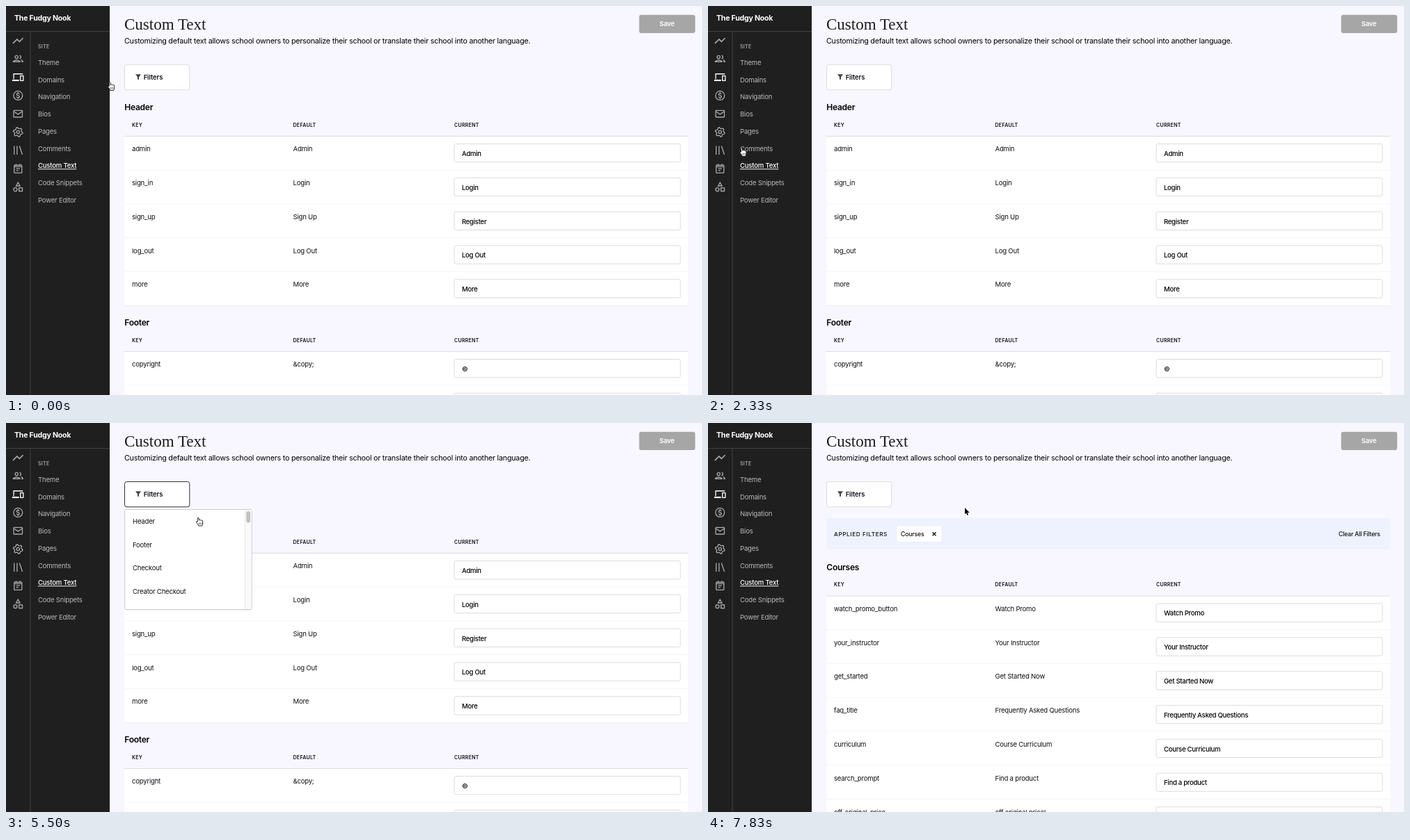
These frames come from a looping animation (1000 by 560 pixels, 8 s). An HTML page:

```html
<!DOCTYPE html>
<html lang="en">
<head>
<meta charset="utf-8">
<title>Custom Text</title>
<style>
  html, body { margin: 0; width: 100%; height: 100%; overflow: hidden; background: #f8f7ff; }
  svg { display: block; width: 100%; height: 100%; }
  text { font: 400 9.55px Inter, "Open Sans", sans-serif; letter-spacing: -.021em; fill: #0e0e16; white-space: pre; }
  .title { font: 400 23px "Liberation Serif", serif; letter-spacing: 0; fill: #1c1c1c; }
  .lead { font-size: 10.73px; fill: #000; }
  .brand { font-size: 10.6px; font-weight: 700; fill: #fff; }
  .heading { font-size: 12px; font-weight: 600; fill: #000; }
  .label { font-size: 7px; font-weight: 600; letter-spacing: .3px; }
  .strong { font-size: 9.4px; font-weight: 600; letter-spacing: -.01em; }
  .value { font-weight: 500; letter-spacing: -.03em; fill: #000; }
  .save { font-weight: 600; fill: #fff; }
  .tip { font-size: 8.6px; font-weight: 700; }
  .applied { font-size: 8.2px; font-weight: 500; letter-spacing: .6px; }
  .chip { font-size: 8.7px; font-weight: 500; }
  .nav { fill: #b9b9b9; }
  .nav.hover { fill: #fff; }
  .nav.active { fill: #fff; font-weight: 500; text-decoration: underline; }
  .site { fill: #a8a8a8; }
  .icon { fill: none; stroke: #a9a9a9; stroke-width: 1.9; }
  .icon.active { stroke: #fff; }
  .box { fill: #fff; stroke: #dcdce0; }
  .box.focus { stroke: #303036; }
</style>
</head>
<body>
<svg id="stage" viewBox="0 0 1000 560"></svg>
<script>
const LOOP = 8000, STEP = 1000 / 6;
const ROW = 48.8, ITEM = 33.4, SCROLL = 74.4;

const text = (x, y, str, cls = '') =>
  `<text x="${x}" y="${y}" class="${cls}">${str.replace(/&/g, '&amp;')}</text>`;
const rect = (x, y, w, h, attrs = '') =>
  `<rect x="${x}" y="${y}" width="${w}" height="${h}" ${attrs}/>`;
const circle = (x, y, r) => `<circle cx="${x}" cy="${y}" r="${r}"/>`;
const path = (d, attrs = '') => `<path d="${d}" ${attrs}/>`;
const group = (id, body) => `<g id="${id}">${body}</g>`;

const gear = () => {
  const points = Array.from({ length: 24 }, (_, i) => {
    const angle = (i + .5) * Math.PI / 12, r = i % 4 < 2 ? 9.8 : 7.4;
    return [12 + r * Math.cos(angle), 12 + r * Math.sin(angle)];
  });
  return path(`M${points.join('L')}z`) + circle(12, 12, 3);
};

// Sidebar icons, each in a 24 unit box
const icons = [
  path('M2 17l8-8 5 5 7-7', 'stroke-width="2.4" stroke-linecap="round"'),
  circle(9, 8, 3) + path('M2 18v-1q7-5 14 0v1zM15 5c4 0 4 6 0 6M18 14q4 1 4 4h-3'),
  path('M22 5H3v11') + path('M0 18.5h14', 'stroke-width="3"') + rect(17, 9, 6, 10),
  circle(12, 12, 9.3) + path('M15 9c-1-2-6-2-6 .5s6 2 6 5-5 2.500-6 0M12 5v2.500M12 16.500v2.500'),
  rect(3, 5, 18, 14, 'rx="1"') + path('M3 7l9 6 9-6'),
  gear(),
  path('M4 3v18M10 3v18M15 3l6 18'),
  rect(4, 5, 16, 16, 'rx="1"') + path('M4 8h16M8 2v3M16 2v3M8 12h8M8 16h5'),
  path('M12 3l4 7H8z') + circle(6.5, 17.5, 3.6) + rect(14, 14, 7, 7)
];
const pages = ['Theme', 'Domains', 'Navigation', 'Bios', 'Pages', 'Comments',
  'Custom Text', 'Code Snippets', 'Power Editor'];

const sidebar =
  rect(0, 0, 149, 560, 'fill="#1f1f1f"') +
  path('M0 36.5H149M35 37V560', 'stroke="#424242"') +
  text(12, 21, 'The Fudgy Nook', 'brand') +
  text(46, 60.5, 'SITE', 'label site') +
  icons.map((body, i) =>
    `<g class="icon${i === 2 ? ' active' : ''}" transform="translate(9 ${41.7 + 26.3 * i}) scale(.69)">${body}</g>`).join('') +
  pages.map((name, i) =>
    text(46, 85 + 24.72 * i, name, name === 'Custom Text' ? 'nav active' : 'nav')).join('');

const row = (y, [key, value, current = value]) =>
  rect(170, y, 810, ROW, 'fill="#fff"') +
  path(`M170 ${y + ROW}H980`, 'stroke="#eeeef1"') +
  text(181, y + 21.7, key) + text(412.5, y + 21.7, value) +
  rect(644, y + 11, 325, 26.3, 'rx="2.5" class="box"') +
  text(655, y + 28.4, current, 'value');

const section = (y, name, rows) =>
  text(170.3, y + 4.3, name, 'heading') +
  text(181, y + 27.5, 'KEY', 'label') +
  text(412.5, y + 27.5, 'DEFAULT', 'label') +
  text(644, y + 27.5, 'CURRENT', 'label') +
  rows.map((r, i) => row(y + 41.5 + ROW * i, r)).join('') +
  path(`M170 ${y + 41.5}H980`, 'stroke="#dcdce2"');

const allSections =
  section(146, 'Header', [['admin', 'Admin'], ['sign_in', 'Login'],
    ['sign_up', 'Sign Up', 'Register'], ['log_out', 'Log Out'], ['more', 'More']]) +
  section(456, 'Footer', [['copyright', '&copy;', '©'], ['', '']]);

const courses =
  rect(170, 137, 810, 45, 'fill="#edf2fe"') +
  text(181, 162.5, 'APPLIED FILTERS', 'applied') +
  rect(271, 148, 65, 23.5, 'rx="1" fill="#fff" stroke="#e6e9f3" stroke-width=".6"') +
  text(277, 162.7, 'Courses', 'chip') +
  path('M322.5 157.3l5 5m0-5l-5 5', 'stroke="#111" stroke-width="1.4"') +
  text(906, 162.7, 'Clear All Filters', 'chip') +
  section(207.5, 'Courses', [['watch_promo_button', 'Watch Promo'],
    ['your_instructor', 'Your Instructor'], ['get_started', 'Get Started Now'],
    ['faq_title', 'Frequently Asked Questions'], ['curriculum', 'Course Curriculum'],
    ['search_prompt', 'Find a product'], ['off_original_price', 'off original price!']]);

const header =
  text(170, 34, 'Custom Text', 'title') +
  text(170, 53.5, 'Customizing default text allows school owners to personalize their school or translate their school into another language.', 'lead') +
  rect(909.7, 12.7, 80.5, 26.3, 'rx="3" fill="#a6a6a6"') +
  text(938.7, 29.4, 'Save', 'save') +
  rect(170.5, 84.5, 93.3, 36.3, 'rx="3" class="box" id="button"') +
  path('M186 98.3h8l-3 4v3.500h-2v-3.500z', 'fill="#444"') +
  text(197.7, 106.3, 'Filters', 'strong');

const options = ['Header', 'Footer', 'Checkout', 'Creator Checkout', 'Courses', 'Lectures', 'Creator Product'];
const menu =
  rect(171, 126, 183, 144, 'rx="3" opacity=".06"') +
  rect(170.5, 124.5, 182.5, 144, 'rx="2" fill="#fff" stroke="#cbcbd0"') +
  rect(171, 184, 172, 34, 'fill="#f3f3f3" id="hover"') +
  `<g clip-path="url(#menuClip)">${group('list',
    options.map((name, i) => text(182, 145.3 + ITEM * i, name)).join(''))}</g>` +
  rect(343.5, 125, 9, 143, 'fill="#fafafa"') +
  path('M343.5 125V268', 'stroke="#e8e8e8"') +
  rect(345.3, 127, 5.7, 16.5, 'rx="2.8" fill="#c1c1c1" id="thumb"');

const tooltip =
  rect(32, 87.5, 37.5, 35.5, 'rx="3" fill="#fff"') +
  path('M33 96l-4.5 4 4.5 4z', 'fill="#fff"') +
  text(42.7, 109, 'Site', 'tip');

const hand =
  path('M-2.8-5q1-2 2 0v3q1-1.500 2 0 1-1 2 .5 1.500-.5 1.500 1v2.500q0 2-1 4h-5q-.5-2-3-5-.5-2 1.500-1z',
    'fill="#fff" stroke="#111" stroke-width=".9" stroke-linejoin="round"') +
  path('M-.5 1.500v2.500m1.700-2.500v2.500m1.700-2.500v2.500', 'stroke="#111" stroke-width=".6"');
const arrow = path('M0 0v9.500l2-2 1.500 3.500 1.500-1-1.300-3h3z',
  'stroke="#fff" stroke-width="1.4" paint-order="stroke"');

document.getElementById('stage').innerHTML =
  '<defs><clipPath id="menuClip"><rect x="171" y="125" width="172" height="143"/></clipPath></defs>' +
  rect(0, 0, 1000, 560, 'fill="#f8f7ff"') + header +
  group('all', allSections) + group('courses', courses) + group('menu', menu) +
  sidebar + group('tooltip', tooltip) + group('hand', hand) + group('arrow', arrow);

const $ = id => document.getElementById(id);
const show = (id, on) => { $(id).style.display = on ? '' : 'none'; };
const theme = document.querySelector('.nav');

const progress = (t, from, to) => Math.min(1, Math.max(0, (t - from) / (to - from)));
const ease = p => p * p * (3 - 2 * p);

// Pointer moves; lift bows the path upward
const moves = [
  { from: 0, to: 1300, x: 14, y: 103, lift: 20 },
  { from: 1600, to: 2600, x: 58, y: 233 },
  { from: 2600, to: 3000, x: 88, y: 234 },
  { from: 3000, to: 3500, x: 75, y: 233 },
  { from: 3500, to: 4600, x: 219.5, y: 111 },
  { from: 5000, to: 5500, x: 278, y: 142 },
  { from: 5800, to: 6800, x: 272, y: 131 },
  { from: 6800, to: 7000, x: 203.5, y: 204 },
  { from: 7300, to: 7830, x: 369, y: 122 }
];

function pointerAt(t) {
  let x = 151, y = 115.5;
  for (const move of moves) {
    const p = ease(progress(t, move.from, move.to));
    x += (move.x - x) * p;
    y += (move.y - y) * p - (move.lift || 0) * Math.sin(Math.PI * p);
  }
  return { x, y };
}

function draw(time) {
  const t = Math.floor((time + 4) / STEP) * STEP;
  const { x, y } = pointerAt(t);
  const scroll = SCROLL * ease(progress(t, 5700, 6830));
  const focused = t >= 4300 && t < 7300;
  const open = t >= 5000 && t < 7300;
  const filtered = t >= 7300;
  const isArrow = x > 152 && !focused;

  show('hand', !isArrow);
  show('arrow', isArrow);
  $(isArrow ? 'arrow' : 'hand').setAttribute('transform', `translate(${x} ${y})`);
  theme.classList.toggle('hover', y < 92 && x > 40 && x < 110);
  show('tooltip', x < 30 && y > 90 && y < 114);
  $('button').classList.toggle('focus', focused);
  show('menu', open);
  show('hover', t >= 6990);
  $('list').setAttribute('transform', `translate(0 ${-scroll})`);
  $('thumb').setAttribute('transform', `translate(0 ${scroll * .138})`);
  show('all', !filtered);
  show('courses', filtered);
}

const start = performance.now();
function tick() {
  draw((performance.now() - start) % LOOP);
  requestAnimationFrame(tick);
}
tick();
</script>
</body>
</html>
```
